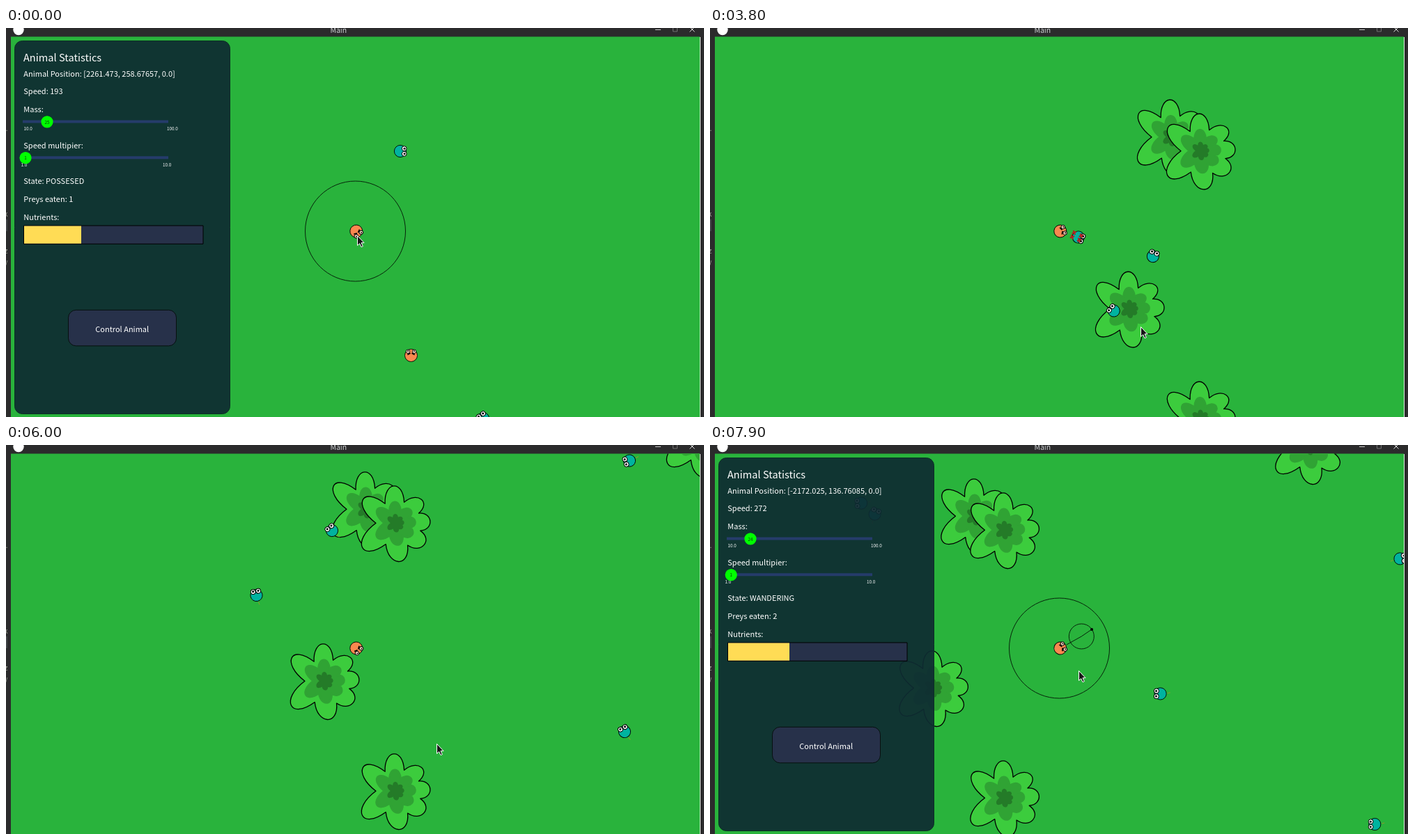
An HTML page with a canvas for the animation above (8000 ms loop, 1002 px wide and 559 px high).

```html
<!DOCTYPE html>
<html lang="en">
<head>
<meta charset="utf-8">
<title>Main</title>
<style>
  html, body { margin: 0; width: 100%; height: 100%; overflow: hidden; background: #2b2b2c; }
  canvas { display: block; }
</style>
</head>
<body>
<canvas id="stage" width="1002" height="559"></canvas>
<script>
const ctx = document.getElementById('stage').getContext('2d');
const LOOP = 8000, STEP = 100, WRAP = 3600, SPEED = 68, RAD = Math.PI / 180;
const FONT = '"Noto Sans CJK JP", "Noto Sans CJK SC", "Noto Sans", sans-serif';
const TEAL = '#00b3a0', ORANGE = '#fa884f';

// Key points: [ms, x, y, heading in degrees]
const victimPath = [[0, 566, 177, 0], [700, 547, 215.5, 22], [1800, 524, 290, 0], [4400, 531, 301, 33]];
const rivalPath = [[0, 581.5, 470.5, -90], [700, 542, 461.5, -42], [2800, 429.5, 440, -137], [3500, 348, 466, -200]];
const pointerPath = [[0, 504, 298], [900, 508, 299], [1900, 618, 429], [7100, 618, 429], [7600, 508, 300], [7900, 529, 324]];
// The ground scrolls under the hunter once the world has wrapped
const groundPath = [[WRAP, 618, 399], [4400, 557, 413], [5200, 503, 386], [6000, 457.5, 339],
  [6600, 421, 314], [7200, 374.5, 324], [7900, 321, 349]];
const bushes = [[60, -247], [102, -227], [0, 0], [102, 158], [-84, 274], [540, -348]];

// Place on the stage and heading at 6000 ms, and turn per second
const GRAZE_TIME = 6000;
const grazers = [[359.5, 216, -101, 18], [468, 123, -130, -28], [895, 22.5, 163, 60],
  [888, 412, -118, -32], [1013, 209, -45, 20], [1220, 535, 180, 0]];

function sample(track, ms, eased) {
  const next = track.findIndex(k => k[0] > ms);
  const i = next < 0 ? track.length - 2 : Math.max(next - 1, 0);
  const a = track[i], b = track[i + 1], span = b[0] - a[0];
  const u = Math.min(1, Math.max(0, (ms - a[0]) / span)), v = u * u, w = v * u;
  const before = track[i - 1] || a, after = track[i + 2] || b;
  return a.slice(1).map((p, n) => {
    const q = b[n + 1];
    const m0 = eased ? 0 : (q - before[n + 1]) / (b[0] - before[0]) * span;
    const m1 = eased ? 0 : (after[n + 1] - p) / (after[0] - a[0]) * span;
    return p + (3 * v - 2 * w) * (q - p) + (w - 2 * v + u) * m0 + (w - v) * m1;
  });
}

const ground = ms => sample(groundPath, ms);

function hunter(ms) {
  let heading = 52 * Math.cos(Math.PI * ms / 800) * Math.exp(-ms / 2500);
  if (ms >= WRAP) {
    const [x0, y0] = ground(ms - 50), [x1, y1] = ground(ms + 50);
    heading = Math.atan2(y0 - y1, x0 - x1) / RAD;
  }
  return [502.8, 292, heading];
}

// Each grazer walks an arc over the ground at constant speed
function grazer([x, y, heading, turn], ms) {
  const s = (ms - GRAZE_TIME) / 1000, half = turn * s / 2 * RAD;
  const reach = SPEED * s * (half ? Math.sin(half) / half : 1), angle = heading * RAD + half;
  const [gx, gy] = ground(ms), [ox, oy] = ground(GRAZE_TIME);
  return [x + gx - ox + reach * Math.cos(angle), y + gy - oy + reach * Math.sin(angle), heading + turn * s];
}

function paint(fill, stroke, width = 1) {
  if (fill) { ctx.fillStyle = fill; ctx.fill(); }
  if (stroke) { ctx.strokeStyle = stroke; ctx.lineWidth = width; ctx.stroke(); }
}
function disc(x, y, r, fill, stroke, width) {
  ctx.beginPath();
  ctx.arc(x, y, r, 0, 7);
  paint(fill, stroke, width);
}
function box(x, y, w, h, r, fill, stroke) {
  ctx.beginPath();
  ctx.roundRect(x, y, w, h, r);
  paint(fill, stroke);
}
function line(points, color, width = 1) {
  ctx.beginPath();
  points.forEach(p => ctx.lineTo(...p));
  paint(null, color, width);
}
function cross(x, y, r, color, width) {
  line([[x - r, y - r], [x + r, y + r]], color, width);
  line([[x + r, y - r], [x - r, y + r]], color, width);
}
function label(text, x, y, size = 11, color = '#fff', align = 'left') {
  ctx.font = `${size}px ${FONT}`;
  ctx.fillStyle = color;
  ctx.textAlign = align;
  ctx.fillText(text, x, y);
}

// Seven lobes: the wider the gap between two tips, the deeper the notch
function makeLeaf() {
  const gaps = [52, 71, 58, 48, 41, 40, 50], leaf = new Path2D();
  const polar = (deg, r) => [r * Math.cos(deg * RAD), r * Math.sin(deg * RAD)];
  const notch = (deg, gap) => polar(deg, 47 - .26 * gap + 2 * Math.sin(deg * RAD));
  let tip = -93, lastGap = gaps[6];
  leaf.moveTo(...notch(tip + lastGap / 2, lastGap));
  for (const gap of gaps) {
    const [x, y] = notch(tip + lastGap / 2, lastGap), [nx, ny] = notch(tip - gap / 2, gap);
    const [tx, ty] = polar(tip, 54.5 - 5 * Math.cos(tip * RAD) + 1.5 * Math.sin(tip * RAD));
    const dx = (tx - (x + nx) / 2) * 4 / 3, dy = (ty - (y + ny) / 2) * 4 / 3;
    leaf.bezierCurveTo(x + dx, y + dy, nx + dx, ny + dy, nx, ny);
    tip -= gap;
    lastGap = gap;
  }
  leaf.closePath();
  return leaf;
}
const leaf = makeLeaf();

function bush(x, y) {
  const layer = (scale, color, edge, width) => {
    ctx.save();
    ctx.translate(x, y);
    ctx.scale(scale, scale);
    ctx.fillStyle = color;
    ctx.fill(leaf);
    ctx.strokeStyle = edge;
    ctx.lineWidth = width;
    ctx.lineJoin = 'round';
    ctx.stroke(leaf);
    ctx.restore();
  };
  layer(1, '#3ccc3d', '#000', 1.3);
  layer(.56, '#30a334', '#30a334', 6);
  layer(.23, '#247b28', '#247b28', 7);
}

function animal([x, y, heading], color, { angry, tail, wounds = 0 } = {}) {
  ctx.save();
  ctx.translate(x, y);
  ctx.rotate(heading * RAD);
  if (tail) line([[-10, 1], [-14, 2]], '#8f9a2c');
  disc(0, 0, angry ? 9 : 8.6, color, '#000', .9);
  for (const side of [-1, 1]) {
    if (angry) {
      disc(5.7, side * 4.5, 2.7, '#ffd9c6', '#111');
      disc(6.2, side * 4.5, 1, '#111');
      line([[3.2, side], [1, side * 5.2]], '#000', 1.7);
    } else {
      disc(5.7, side * 3.8, 3.4, '#fff', '#000');
      disc(6, side * 3.8, 1.5, '#000');
    }
  }
  for (let i = 0; i < wounds; i++) cross(i % 2 ? 3 : -8, i < 2 ? -3.5 : 3.5, 2.4, '#b81e1d', 2);
  ctx.restore();
}

function slider(y, knob, value, low, lowX, high, highX) {
  line([[24, y], [233, y]], '#253c6b', 4);
  label(low, lowX, y + 12.5, 6.3);
  label(high, highX, y + 12.5, 6.3);
  disc(knob, y + .3, 8.6, '#00ff00');
  label(value, knob, y + 3, 6.3, '#053d05', 'center');
}

function panel(ms) {
  const late = ms > WRAP, dt = (late ? ms - 7900 : ms) / 1000;
  const px = (late ? -2172.025 + 77 * dt : 2261.473 + 48 * dt).toFixed(3);
  const py = (late ? 136.76085 + 36 * dt : 258.67657 - 60 * dt).toFixed(5);
  box(12.5, 18.5, 309, 536, 11, 'rgba(14,44,50,.93)', '#0b3024');
  label('Animal Statistics', 25, 48, 14.6);
  [`Animal Position: [${px}, ${py}, 0.0]`, `Speed: ${late ? 272 : 193}`, 'Mass:', '', 'Speed multipier:', '',
    `State: ${late ? 'WANDERING' : 'POSSESED'}`, `Preys eaten: ${late ? 2 : 1}`, 'Nutrients:'
  ].forEach((text, i) => label(text, 25.3, 69.5 + i * 25.75));
  slider(134.5, late ? 58 : 59, late ? '24' : '25', '10.0', 25.5, '100.0', 231);
  slider(186.3, late ? 30.3 : 28, '1', '1.0', 21.5, '10.0', 225);
  box(25.5, 284, 257.5, 26.3, 0, '#27314a', '#000');
  box(26, 284.5, late ? 88 : 82, 25.3, 0, '#ffdc55');
  box(89.5, 405.3, 155, 51.5, 11, '#27314a', '#07100f');
  label('Control Animal', 166.7, 437, 11, '#fff', 'center');
}

function senses(ms, [x, y]) {
  disc(501.5, 292, 72, null, '#06240a');
  if (ms < WRAP) return;
  disc(533.3, 275, 18, null, '#06240a');
  line([[x + 9, y - 5], [533.3, 275], [548, 265]], '#06240a');
  disc(548, 265, 2, '#000');
}

function windowFrame() {
  ctx.fillStyle = '#2b2b2c';
  ctx.fillRect(0, 0, 1002, 559);
  label('Main', 477.3, 6.5, 10.5, '#cfd2d4', 'center');
  disc(18, 2.5, 7.7, '#fff');
  line([[932, 2.5], [940, 2.5]], '#c8c8c8');
  box(957.5, -1.5, 6, 6.5, 0, null, '#707070');
  cross(985, 2, 3.5, '#ddd');
  ctx.fillStyle = '#424447';
  ctx.fillRect(0, 275, 2, 17);
  [['.', 148], ['k', 271], ['z', 324], ['/', 342]].forEach(([c, y]) => label(c, 2.5, y, 10, '#a5a59a', 'right'));
  ctx.fillStyle = '#e4efe5';
  ctx.fillRect(996, 13, 1, 546);
}

const arrow = new Path2D('M.5.5v14l3.2-2.8 2.3 5 2.3-1-2.2-5h4z');
function cursor([x, y]) {
  ctx.save();
  ctx.translate(x, y);
  ctx.fillStyle = '#161616';
  ctx.fill(arrow);
  ctx.strokeStyle = '#fff';
  ctx.lineWidth = 1;
  ctx.stroke(arrow);
  ctx.restore();
}

function draw(ms) {
  const s = ms / 1000, self = hunter(ms);
  windowFrame();
  ctx.save();
  ctx.beginPath();
  ctx.rect(7, 12.5, 989, 547);
  ctx.clip();
  ctx.fillStyle = '#29b33c';
  ctx.fillRect(7, 12, 989, 547);
  if (ms >= WRAP) {
    const [gx, gy] = ground(ms);
    bushes.forEach(([dx, dy]) => bush(gx + dx, gy + dy));
    grazers.forEach(g => animal(grazer(g, ms), TEAL, { tail: ms > 4800 }));
  } else {
    animal([685 - 134 * s, 561 - 30 * s + 25.5 * s * s, -125], TEAL);
    animal(sample(rivalPath, ms), ORANGE, { angry: true });
  }
  animal(self, ORANGE, { angry: true });
  if (ms < 4900) {
    const wounds = Math.min(4, Math.max(0, Math.floor((ms - 1600) / 250)));
    animal(sample(victimPath, ms), TEAL, { wounds });
  }
  if (ms < 400 || ms >= 7700) {
    senses(ms, self);
    panel(ms);
  }
  cursor(sample(pointerPath, ms, true));
  ctx.restore();
}

function tick() {
  draw(Math.floor(performance.now() % LOOP / STEP) * STEP);
  requestAnimationFrame(tick);
}
tick();
</script>
</body>
</html>
```
